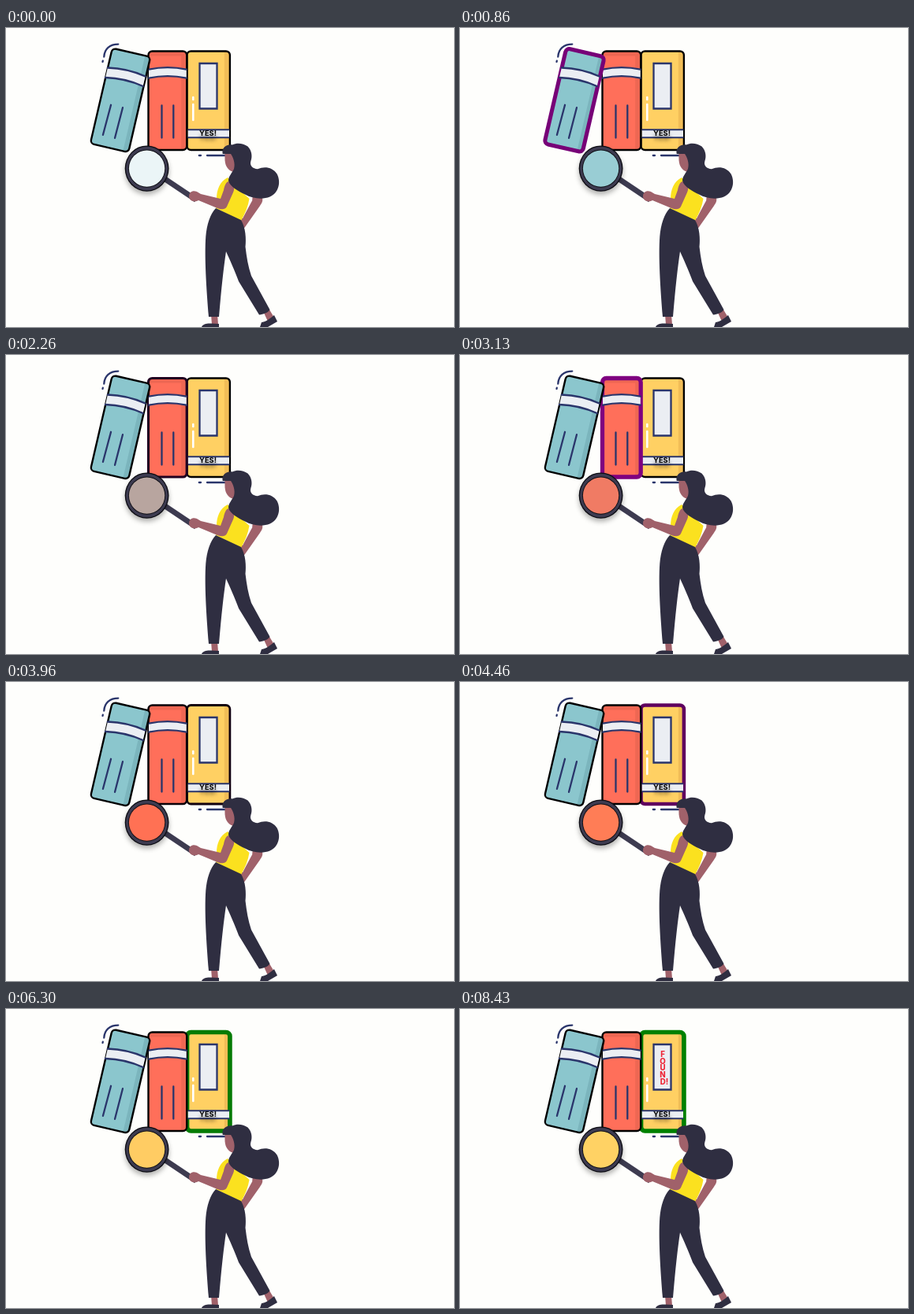
Animation of 568x380 px, one loop 9300 ms. Source, as an HTML page with a canvas:

```html
<!DOCTYPE html>
<html lang="en">
<head>
<meta charset="utf-8">
<title>Book search</title>
<style>
  html, body { margin: 0; width: 100%; height: 100%; overflow: hidden; background: #fefefc; }
  canvas { display: block; width: 568px; height: 380px; }
</style>
</head>
<body>
<canvas id="stage"></canvas>
<script>
const W = 568, H = 380, LOOP = 9300;
const NAVY = '#2a356b', PALE = '#ebeef3', HAIR = '#2f2e41', SKIN = '#a0616a', RING = '#3d3b50';
const BLACK = [0, 0, 0], PURPLE = [128, 0, 128], GREEN = [0, 128, 0];
const THIN = 2.4, THICK = 5.3;

const canvas = document.getElementById('stage');
const ctx = canvas.getContext('2d');
const dpr = window.devicePixelRatio || 1;
canvas.width = W * dpr;
canvas.height = H * dpr;

// Keys are [time, ...values]; values ease in and out between them.
function track(keys, t) {
  if (t <= keys[0][0]) return keys[0].slice(1);
  for (let i = 1; i < keys.length; i++) {
    const a = keys[i - 1], b = keys[i];
    if (t < b[0]) {
      const p = (t - a[0]) / (b[0] - a[0]);
      const e = (1 - Math.cos(Math.PI * p)) / 2;
      return a.slice(1).map((v, k) => v + (b[k + 1] - v) * e);
    }
  }
  return keys[keys.length - 1].slice(1);
}

const rgb = c => `rgb(${c.slice(0, 3).map(Math.round).join(',')})`;

const outlines = [
  [[0, ...BLACK, THIN], [1033, ...PURPLE, THICK], [2080, ...BLACK, THIN]],
  [[1860, ...BLACK, THIN], [3060, ...PURPLE, THICK], [4130, ...BLACK, THIN]],
  [[3700, ...BLACK, THIN], [4850, ...PURPLE, THICK], [6510, ...GREEN, THICK + .4]]
];
const lens = [
  [0, 235, 245, 247], [1150, 139, 198, 206], [3750, 255, 112, 84], [6800, 255, 210, 100]
];
const found = [[6600, 0], [8430, 1]];

function fill(d, color) {
  ctx.fillStyle = color;
  ctx.fill(new Path2D(d));
}

function stroke(d, color = NAVY, width = 2.3) {
  ctx.strokeStyle = color;
  ctx.lineWidth = width;
  ctx.stroke(new Path2D(d));
}

function oval(rx, ry, color) {
  ctx.fillStyle = color;
  ctx.beginPath();
  ctx.ellipse(178.6, 178.6, rx, ry, 0, 0, 7);
  ctx.fill();
}

function cover(x, y, w, h, color, shade, edge, lip = 0) {
  const box = new Path2D();
  box.roundRect(x, y, w, h, 5);
  ctx.fillStyle = color;
  ctx.fill(box);
  ctx.save();
  ctx.clip(box);
  ctx.fillStyle = shade;
  ctx.fillRect(x + w - 7, y, 7, h);
  ctx.fillRect(x, y, w, lip);
  ctx.restore();
  ctx.strokeStyle = rgb(edge);
  ctx.lineWidth = edge[3];
  ctx.stroke(box);
}

function curvedBand(x1, x2, top, bottom) {
  const mid = (x1 + x2) / 2;
  fill(`M${x1} ${top}Q${mid} ${top - 5} ${x2} ${top}V${bottom}Q${mid} ${bottom - 5} ${x1} ${bottom}Z`, PALE);
  for (const y of [top, bottom]) stroke(`M${x1} ${y}Q${mid} ${y - 5} ${x2} ${y}`);
}

function label(text, x, y, size, color) {
  ctx.font = `800 ${size}px Inter, "Open Sans", sans-serif`;
  ctx.textAlign = 'center';
  ctx.textBaseline = 'middle';
  ctx.fillStyle = color;
  ctx.fillText(text, x, y);
}

function blurred(color, blur, dy, draw) {
  ctx.save();
  ctx.shadowColor = color;
  ctx.shadowBlur = blur * dpr;
  ctx.shadowOffsetY = dy * dpr;
  draw();
  ctx.restore();
}

function yellowBook(t) {
  cover(229.5, 29.5, 54.4, 125.5, '#ffd063', '#f1bd57', track(outlines[2], t));
  stroke('M237.3 88V91M237.3 97V117', '#fff', 2.6);
  fill('M245.5 45H267.5V102.5H245.5Z', PALE);
  stroke('M245.5 45H267.5V102.5H245.5Z');
  fill('M230.5 129.3H283V139.3H230.5Z', PALE);
  stroke('M231 129.3H282.6M231 139.3H282.6', NAVY, 2.1);
  blurred('rgba(0,0,0,.5)', 4, 6, () => label('YES!', 256, 134.3, 9.2, '#111'));

  const [alpha] = track(found, t);
  if (alpha > 0) {
    ctx.globalAlpha = alpha;
    ['F', 'O', 'U', 'N', 'D!'].forEach((s, i) =>
      label(s, i === 4 ? 259 : 257, 58 + i * 8.7, 9.7, '#ee2737'));
    ctx.globalAlpha = 1;
  }
}

function redBook(t) {
  cover(180.5, 29.5, 48.7, 125.5, '#ff6f5a', '#ee6753', track(outlines[1], t), 6);
  curvedBand(181, 228.8, 52.6, 63.6);
  stroke('M197.5 98.5V139.5M212.3 98.5V139.5');
}

function tealBook(t) {
  ctx.save();
  ctx.translate(145, 91.8);
  ctx.rotate(13 * Math.PI / 180);
  cover(-24.8, -62.2, 49.6, 124.4, '#8bc6cd', '#7bb5bd', track(outlines[0], t));
  curvedBand(-25, 24, -36.6, -23.8);
  stroke('M-10.3 8.5L-11.6 47.8M5 8.5L4 48.3');
  ctx.restore();
}

function woman() {
  // far arm, top and trousers
  fill('M313 213L325 216C326 220 324 223 322 226L303 253C301 256 298 255 297 245L312 219Z', SKIN);
  fill('M308 217L312.5 218.5L300 242L298 241Z', '#fefefc');
  fill('M281 190C271 195 267 206 267 217L269 222L266 229L298 245C303 236 307 227 308.5 217L290 200Z', '#fbe11f');
  fill('M260 364L268 364L269 377L261 377ZM327 362L334 358L340 368L332 373Z', SKIN);
  fill('M248 380C249 376 256 375 260 375.5L270 376V380Z', HAIR);
  fill('M322 380L324 374C328 374 334 370 340 365L344 373L332 380Z', HAIR);
  fill('M266 229L298 244C304 254 304.5 268 303.5 278C305 291 307 303 311 315L334.5 358C332 362 326 364 321 364.5' +
    'L295 322C290 308 283 293 279 284C276 304 273 330 270 367L257 367' +
    'C254 330 251.5 290 253.3 265C254.5 250 259 236 266 229Z', HAIR);
  // near arm
  fill('M282 195C288 197 291 203 288 209L280 227C278 231 273 231 268 229L244 219C240 222 232 220 232 214' +
    'C232 208 237 206 242 208L247 211L272 217L276 206C277 200 279 196 282 195Z', SKIN);
  // face and hair
  fill('M277.4 159L289 158C294 168 292 179 288 183C282 181 278 176 277.5 168Z', SKIN);
  fill('M274.7 160C273 152 280 147.5 287 148.4C293 145.5 301 146.5 306.5 150.5C312 156 312.4 164 310.4 169' +
    'C308.5 175 313 178.8 319 179.3C328 175.4 338 177 343.6 185.5C349 196 345.8 209.5 334.5 214.6' +
    'C325 218.6 312 216.6 303 211.5C295 207.5 284 202 282 194C282 188 287 184 289 179C291 172 288 164 285 160Z', HAIR);
}

function magnifier(t) {
  ctx.lineCap = 'butt';
  stroke('M200 190.8L241 218.4', RING, 6.9);
  blurred('rgba(0,0,0,.3)', 6, 4, () => oval(27.9, 29.2, '#0c0c12'));
  oval(26.6, 27.9, RING);
  oval(23.6, 24.1, '#0c0c12');
  oval(22.7, 23.2, rgb(track(lens, t)));
  ctx.lineCap = 'round';
}

function draw(t) {
  ctx.setTransform(dpr, 0, 0, dpr, 0, 0);
  ctx.fillStyle = '#fefefc';
  ctx.fillRect(0, 0, W, H);
  ctx.lineCap = 'round';
  stroke('M124.3 36.5C124.8 26.5 131.5 20.6 142.3 20.6M122.8 41.7L122.5 43');
  stroke('M244.8 162H247M255 162H283');
  yellowBook(t);
  redBook(t);
  tealBook(t);
  magnifier(t);
  woman();
}

const start = performance.now();
function tick() {
  draw((performance.now() - start) % LOOP);
  requestAnimationFrame(tick);
}
tick();
</script>
</body>
</html>
```
